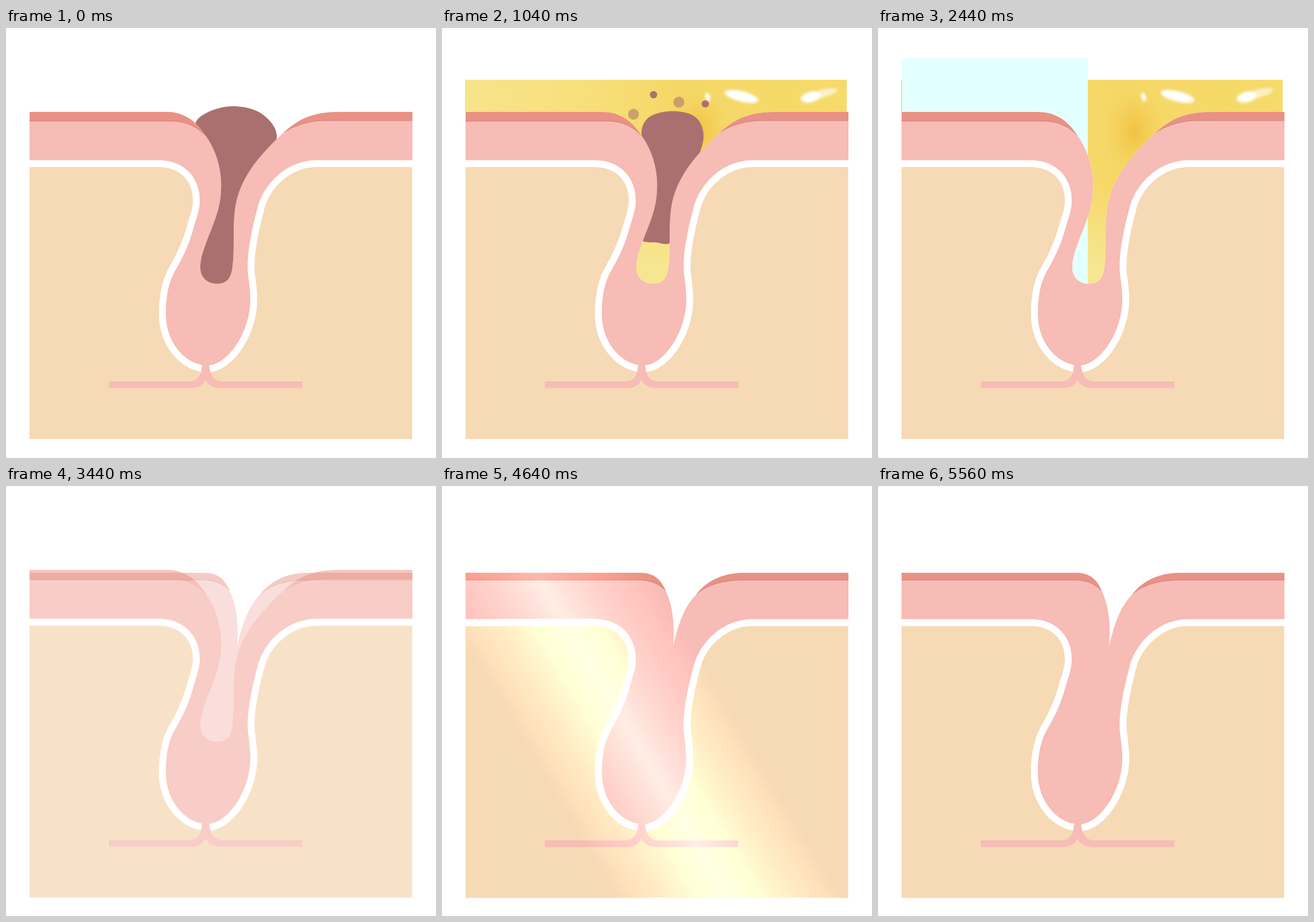
An HTML page that plays this animation: 748 by 748 pixels, repeating every 6.96 s.

```html
<!DOCTYPE html>
<html lang="en">
<head>
<meta charset="utf-8">
<title>Pore cleansing</title>
<style>
  html, body { margin: 0; height: 100%; overflow: hidden; background: #fff; }
  svg { display: block; width: 100vw; height: 100vh; }
  .tissue { fill: #f6d9b5; }
  .gap { fill: #fff; stroke: #fff; stroke-width: 24; }
  .skin { fill: #f6bcb5; }
  .surface { fill: #e99185; }
  .seam { fill: none; stroke: #a8665f; stroke-width: .8; opacity: .7; }
  .dirt { fill: #aa7070; }
  #shine { mix-blend-mode: color-dodge; }
</style>
</head>
<body>
<svg viewBox="0 0 748 748">
  <defs>
    <linearGradient id="oilTone">
      <stop offset="0" stop-color="#f7e38c"/>
      <stop offset=".3" stop-color="#f7e07c"/>
      <stop offset=".55" stop-color="#f5d766"/>
      <stop offset="1" stop-color="#f6db6a"/>
    </linearGradient>
    <linearGradient id="oilDepth" x2="0" y2="1">
      <stop offset=".5" stop-color="#f6e691" stop-opacity="0"/>
      <stop offset=".9" stop-color="#f6e691"/>
    </linearGradient>
    <radialGradient id="amber">
      <stop offset="0" stop-color="#f0bb37" stop-opacity=".8"/>
      <stop offset="1" stop-color="#f4cd52" stop-opacity="0"/>
    </radialGradient>
    <linearGradient id="beam" gradientUnits="userSpaceOnUse" x1="183" y1="521" x2="477" y2="345">
      <stop offset="0" stop-color="#000"/>
      <stop offset=".25" stop-color="#191919"/>
      <stop offset=".5" stop-color="#353535"/>
      <stop offset=".75" stop-color="#191919"/>
      <stop offset="1" stop-color="#000"/>
    </linearGradient>
    <filter id="soft"><feGaussianBlur stdDeviation="2"/></filter>
    <clipPath id="open"><path id="openShape"/></clipPath>
    <clipPath id="oilWipe"><rect id="oilWindow" x="40" y="80" height="380"/></clipPath>
  </defs>

  <g id="clogged"></g>
  <g id="clean"></g>

  <g clip-path="url(#open)">
    <g id="oil" clip-path="url(#oilWipe)">
      <rect x="40" y="90" width="664" height="356" fill="url(#oilTone)"/>
      <rect x="40" y="90" width="664" height="356" fill="url(#oilDepth)"/>
      <ellipse cx="446" cy="180" rx="52" ry="80" fill="url(#amber)"/>
      <g fill="#fff" filter="url(#soft)">
        <ellipse cx="462" cy="120" rx="4" ry="8" transform="rotate(-15 462 120)"/>
        <ellipse cx="521" cy="119" rx="30" ry="9" transform="rotate(14 521 119)"/>
        <ellipse cx="642" cy="120" rx="18" ry="9" transform="rotate(-14 642 120)"/>
        <ellipse cx="662" cy="114" rx="26" ry="7" transform="rotate(-14 662 114)" opacity=".6"/>
      </g>
    </g>
    <rect id="rinse" x="42" y="52" height="400" fill="#e4ffff"/>
    <path id="plug" class="dirt"/>
    <g id="specks"></g>
  </g>
  <rect id="shine" x="41" y="150" width="666" height="567" fill="url(#beam)"/>
</svg>

<script>
const $ = id => document.getElementById(id);
const LOOP = 6960, STEP = 40;

const outline = 'H540C490 230 447 270 437 315C425 360 418 400 421 428C424 450 425 460 425 472' +
  'C425 530 385 587 350 587C315 587 278 550 278 497C278 465 283 440 296 419' +
  'C310 395 320 372 327 345C333 325 337 315 337 300C337 260 310 230 265 230H41';
const stem = 'M341 586C340 607 332 615 318 615H179V626.5H320C337 626.5 344 619 347 611' +
  'C350 619 358 626.5 375 626.5H515.5V615H377C363 615 355 607 353.5 586Z';

const cloggedTop = 'M41 146H280C310 146 332 163 347 187C365 212 376 245 374 282' +
  'C373 320 356 350 346 380C338 400 336 418 340 428C345 440 356 445 367 445' +
  'C385 445 392 434 394 415C398 385 394 350 398 318C403 275 425 235 484 181' +
  'C512 155 540 146 580 146H707';
const cleanTop = 'M41 151H345C370 151 382 165 389 182C401 208 405 235 402 278' +
  'C410 245 420 210 443 188C465 160 495 151 530 151H707';

// Each half of the surface layer: outer edge, then the seam back along its underside.
function drawTissue(group, top, drop, halves) {
  const surface = halves.map(([outer, tip, seam]) =>
    `<path class="surface" d="${outer} ${seam}Z"/><path class="seam" d="M${tip}${seam}"/>`).join('');
  group.innerHTML = `
    <g transform="translate(0 ${drop})">
      <rect class="tissue" x="41" y="242" width="665.5" height="473"/>
      <path class="gap" d="M706.5 230${outline}"/>
    </g>
    <path class="skin" d="${top}V${230 + drop}${drop ? shifted(outline, drop) : outline}Z"/>
    <path class="skin" transform="translate(0 ${drop})" d="${stem}"/>${surface}`;
}

// Moves the y value of every coordinate pair in a path down.
function shifted(path, dy) {
  return path.replace(/(\d+) (\d+)/g, (_, x, y) => `${x} ${+y + dy}`);
}

drawTissue($('clogged'), cloggedTop, 0, [
  ['M41 146H280C310 146 332 163 347 187', '347 187', 'C330 170 312 162 288 162H41'],
  ['M707 146H580C540 146 512 155 484 181', '484 181', 'C505 168 530 161 555 161H707']
]);
drawTissue($('clean'), cleanTop, 1.5, [
  ['M41 151H345C370 151 382 165 389 182', '389 182', 'C378 171 365 163.5 340 163.5H41'],
  ['M707 151H530C495 151 465 160 443 188', '443 188', 'C460 172 490 163.5 525 163.5H707']
]);
$('openShape').setAttribute('d', cloggedTop.replace('M41', 'M40') + 'V0H40Z');

const plugPoses = [
  [720, [328,170, 352,146, 398,136, 446,150, 471,190, 440,250, 412,310, 408,400, 367,455, 325,405, 355,300, 335,220]],
  [1040, [347,180, 362,154, 402,144.5, 441,155, 455,190, 438,245, 412,310, 400,370, 373,373, 345,364, 360,300, 355,220]],
  [1440, [372,165, 388,145, 418,138, 448,148, 456,178, 434,215, 410,260, 398,300, 385,306, 375,298, 380,250, 378,205]],
  [1840, [441,139, 452,126, 468,126, 484,138, 484,156, 462,174, 446,196, 437,213, 421,220, 404,209, 409,194, 430,170]],
  [2160, [485,122, 496,109, 512,109, 528,121, 528,139, 506,157, 490,179, 481,196, 465,203, 448,192, 453,177, 474,153]]
];

// Position at 1040 ms, velocity in px per ms, radius and the time it starts to appear.
const specks = [
  { x: 333, y: 150, vx: .090, vy: 0, r: 9.5, from: 880 },
  { x: 368, y: 116, vx: .126, vy: -.009, r: 6.3, from: 720 },
  { x: 412, y: 129, vx: .129, vy: -.026, r: 9.5, from: 880 },
  { x: 458, y: 132, vx: .096, vy: -.015, r: 6.3, from: 720 }
];
$('specks').innerHTML = specks.map(s => `<circle class="dirt" r="${s.r}"/>`).join('');

const ramp = (t, from, to) => Math.min(1, Math.max(0, (t - from) / (to - from)));
const set = (id, name, value) => $(id).setAttribute(name, value);

function plugPoints(t) {
  const next = Math.max(1, plugPoses.findIndex(p => p[0] >= t));
  const [t0, a] = plugPoses[next - 1], [t1, b] = plugPoses[next];
  const k = ramp(t, t0, t1);
  return a.map((v, i) => v + (b[i] - v) * k);
}

// Closed Catmull-Rom curve through a flat list of points.
function smooth(flat) {
  const n = flat.length / 2;
  const at = i => { const j = (i + n) % n; return [flat[2 * j], flat[2 * j + 1]]; };
  let d = `M${at(0)}`;
  for (let i = 0; i < n; i++) {
    const [p, q, r, s] = [at(i - 1), at(i), at(i + 1), at(i + 2)];
    d += `C${q.map((v, k) => v + (r[k] - p[k]) / 6)} ${r.map((v, k) => v - (s[k] - q[k]) / 6)} ${r}`;
  }
  return d + 'Z';
}

function draw(t) {
  const swap = ramp(t, 3200, 3700);
  set('clogged', 'opacity', 1 - swap);
  set('clean', 'opacity', swap);

  const rinsed = 666 * ramp(t, 2120, 2780);
  set('oil', 'visibility', t < 2780 ? 'visible' : 'hidden');
  set('oilWindow', 'width', 666 * ramp(t, 0, 560));
  set('rinse', 'width', rinsed);
  set('rinse', 'opacity', 1 - ramp(t, 2880, 3200));

  const plugAlpha = 1 - ramp(t, 1720, 2160);
  set('plug', 'opacity', plugAlpha);
  if (plugAlpha) set('plug', 'd', smooth(plugPoints(t)));

  specks.forEach((s, i) => {
    const dot = $('specks').children[i];
    dot.setAttribute('cx', s.x + s.vx * (t - 1040));
    dot.setAttribute('cy', s.y + s.vy * (t - 1040));
    dot.setAttribute('opacity', ramp(t, s.from, s.from + 300) * (1 - ramp(t, 1900, 2160)));
  });

  const n = (t - 4120) / STEP;
  set('shine', 'visibility', n > 0 && n < 36 ? 'visible' : 'hidden');
  set('beam', 'gradientTransform', `translate(${53.3 * n - .43 * n * n - 620} 0)`);
}

const start = performance.now();
function tick() {
  const t = (performance.now() - start) % LOOP;
  draw(Math.floor(t / STEP) * STEP);
  requestAnimationFrame(tick);
}
tick();
</script>
</body>
</html>
```
